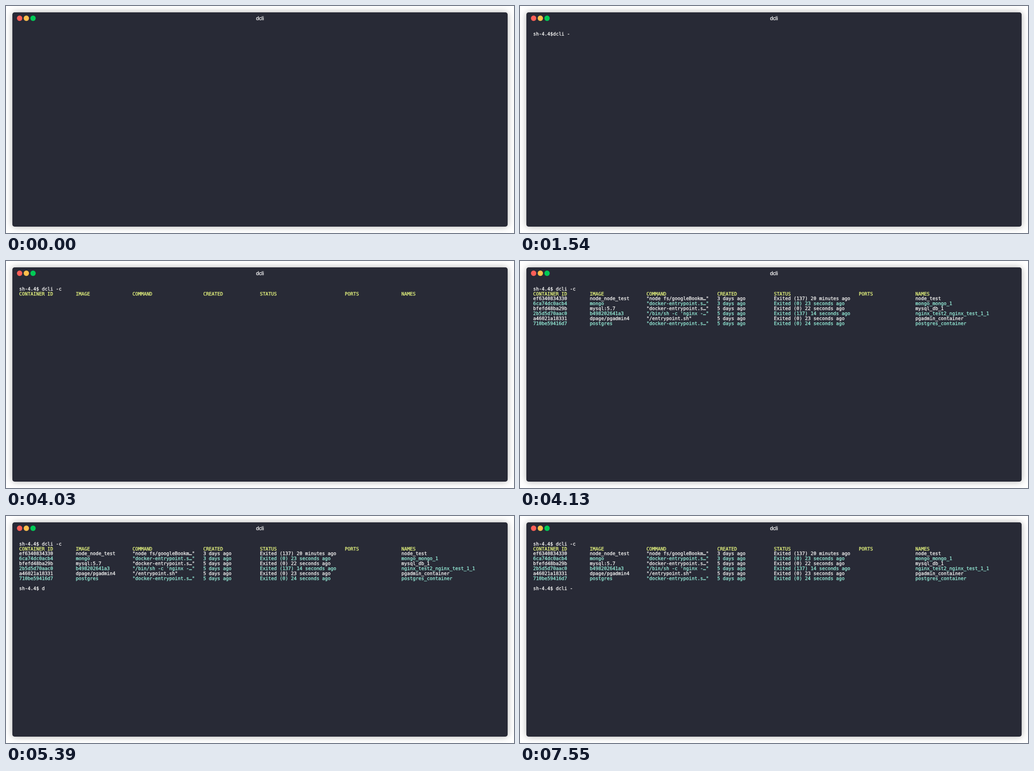
An HTML page that plays this animation: 1119x500 px, repeating every 8 s.

```html
<!DOCTYPE html>
<html lang="en">
<head>
<meta charset="utf-8">
<title>dcli</title>
<style>
  html, body { margin: 0; width: 100%; height: 100%; overflow: hidden; background: #fff; }
  .window {
    position: absolute; left: 14px; top: 14px; width: 1091px; height: 472px;
    border-radius: 5px; background: #282a36; box-shadow: 0 0 15px rgba(0, 0, 0, .3);
  }
  svg { position: absolute; left: 0; top: 0; display: block; }
  text { white-space: pre; text-rendering: geometricPrecision; }
  .title {
    font: 11.5px "Liberation Sans", Arial, sans-serif; text-anchor: middle;
    fill: #fff; stroke: #fff; stroke-width: .3px;
  }
  .term {
    font: 10.36px "DejaVu Sans Mono", monospace;
    fill: #f1f1f0; stroke: #f1f1f0; stroke-width: .35px;
  }
  .head { fill: #e6f57f; stroke: #e6f57f; }
  .alt { fill: #94ead6; stroke: #94ead6; }
</style>
</head>
<body>
<div class="window"></div>
<svg width="1119" height="500" viewBox="0 0 1119 500">
  <circle cx="30" cy="27" r="5.9" fill="#ff5f58"/>
  <circle cx="44.8" cy="27" r="5.9" fill="#ffbe4b"/>
  <circle cx="59.6" cy="27" r="5.9" fill="#00ca56"/>
  <text class="title" x="559.5" y="31">dcli</text>
  <g class="term" id="term"></g>
</svg>
<script>
  const LOOP = 8000;
  const LEFT = 29, BASE = 64.7, CELL = 6.237, LINE = 10.89;
  const COLUMNS = [0, 20, 40, 65, 85, 115, 135];
  const PROMPT = 'sh-4.4$';

  const header = ['CONTAINER ID', 'IMAGE', 'COMMAND', 'CREATED', 'STATUS', 'PORTS', 'NAMES'];
  const entry = '"docker-entrypoint.s…"';
  const rows = [
    ['ef6340834330', 'node_node_test', '"node fs/googleBookm…"', '3 days ago', 'Exited (137) 20 minutes ago', '', 'node_test'],
    ['6ca74dc0acb4', 'mongo', entry, '3 days ago', 'Exited (0) 23 seconds ago', '', 'mongo_mongo_1'],
    ['bfefd48ba29b', 'mysql:5.7', entry, '5 days ago', 'Exited (0) 22 seconds ago', '', 'mysql_db_1'],
    ['2b5d5d70aac0', 'b498202641a3', '"/bin/sh -c \'nginx -…"', '5 days ago', 'Exited (137) 14 seconds ago', '', 'nginx_test2_nginx_test_1_1'],
    ['a46021a18331', 'dpage/pgadmin4', '"/entrypoint.sh"', '5 days ago', 'Exited (0) 23 seconds ago', '', 'pgadmin_container'],
    ['710be59416d7', 'postgres', entry, '5 days ago', 'Exited (0) 24 seconds ago', '', 'postgres_container'],
  ];

  // Each step: start time, text after the prompt
  const firstCommand = [
    [100, ''], [430, 'd'], [690, 'dc'], [840, 'dcl'], [1120, 'dcli'],
    [1540, 'dcli -'], [1720, 'dcli -c'], [2600, ' dcli -c'],
  ];
  const secondCommand = [
    [4250, ' '], [5390, ' d'], [5660, ' dc'], [5800, ' dcl'], [6060, ' dcli'], [7550, ' dcli -'],
  ];

  const term = document.getElementById('term');

  function make(tag, parent, attrs) {
    const el = document.createElementNS('http://www.w3.org/2000/svg', tag);
    for (const name in attrs) el.setAttribute(name, attrs[name]);
    return parent.appendChild(el);
  }

  function addText(parent, col, line, text = '') {
    const el = make('text', parent, { x: LEFT + col * CELL, y: BASE + line * LINE });
    el.textContent = text;
    return el;
  }

  function addRow(parent, cells, line, style) {
    const group = make('g', parent, { class: style });
    cells.forEach((cell, i) => cell && addText(group, COLUMNS[i], line, cell));
    return group;
  }

  const head = addRow(term, header, 1, 'head');
  const body = make('g', term, {});
  rows.forEach((cells, i) => addRow(body, cells, i + 2, i % 2 ? 'alt' : ''));

  const prompts = [
    { el: addText(term, 0, 0), steps: firstCommand },
    { el: addText(term, 0, 9), steps: secondCommand },
  ];

  function typed(steps, t) {
    const done = steps.filter(([start]) => t >= start);
    return done.length ? PROMPT + done[done.length - 1][1] : '';
  }

  function show(el, on) {
    el.setAttribute('visibility', on ? 'visible' : 'hidden');
  }

  function draw() {
    const t = performance.now() % LOOP;
    for (const { el, steps } of prompts) {
      const text = typed(steps, t);
      if (el.textContent !== text) el.textContent = text;
    }
    show(head, t >= 4030);
    show(body, t >= 4130);
    requestAnimationFrame(draw);
  }
  draw();
</script>
</body>
</html>
```
